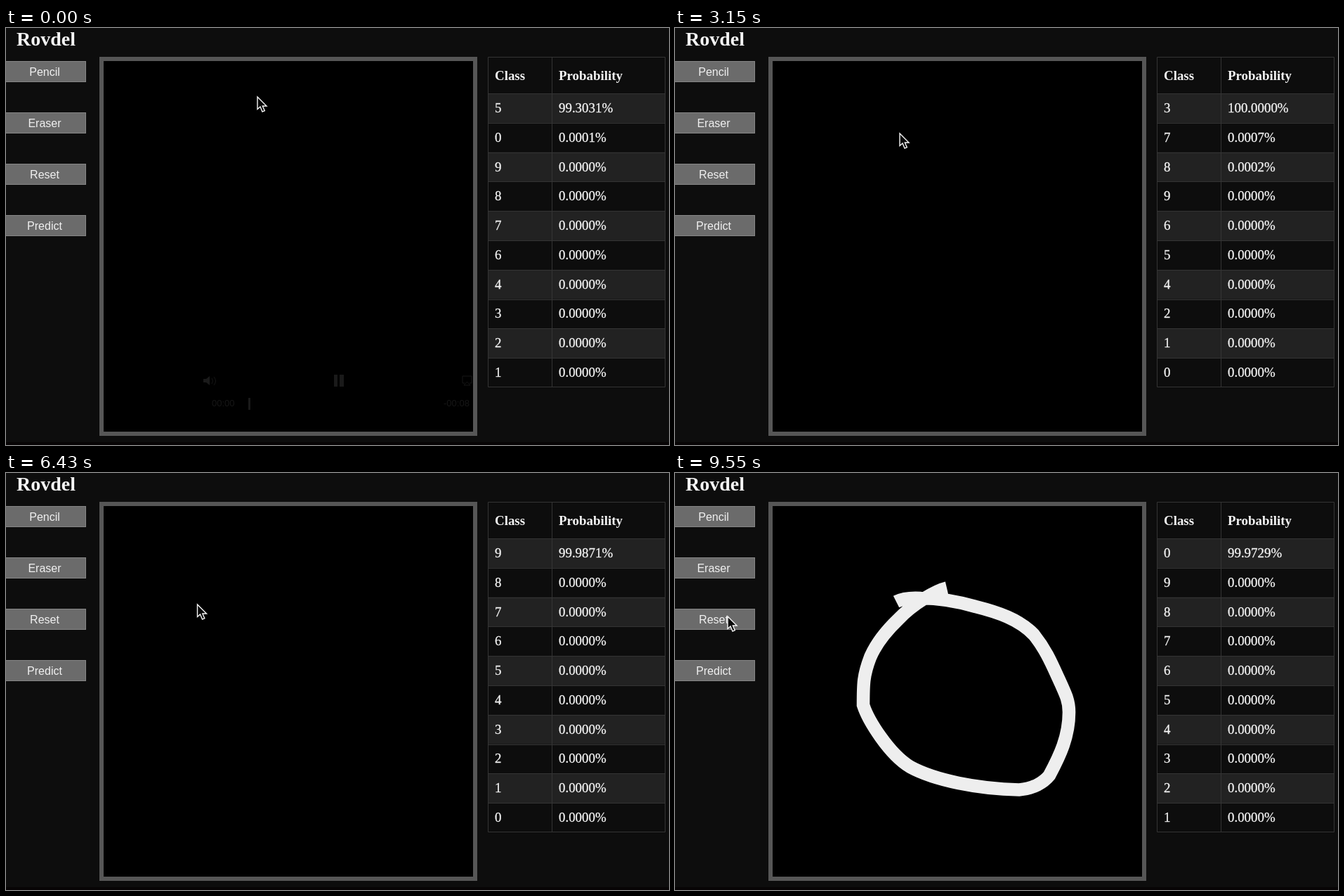
Animation of 944 by 593 pixels, one loop 9700 ms. Source, as an HTML page:

```html
<!DOCTYPE html>
<html lang="en">
<head>
<meta charset="utf-8">
<title>Rovdel</title>
<style>
  html, body { margin: 0; width: 100%; height: 100%; overflow: hidden; background: #0d0d0d; }
  svg { display: block; }
  text { fill: #f4f4f4; font-family: "Liberation Serif", "Times New Roman", serif; }
  .title { font-size: 28px; font-weight: bold; }
  .cell { font-size: 18.9px; stroke: #f4f4f4; stroke-width: .3; }
  .head { font-size: 18.9px; font-weight: bold; }
  .button { font: 16px "Liberation Sans", Arial, sans-serif; text-anchor: middle; fill: #f0f0f0; }
  #player { fill: #1a1a1a; }
  #player text { font: 13px "Liberation Sans", Arial, sans-serif; fill: #161616; }
</style>
</head>
<body>
<svg id="stage" width="944" height="593" viewBox="0 0 944 593">
  <rect y="589" width="944" height="4" fill="#070405"/>
  <text class="title" x="15" y="25">Rovdel</text>
  <g id="ui"></g>
  <rect x="136" y="44" width="532" height="533" fill="#000" stroke="#565656" stroke-width="6"/>
  <g id="player">
    <path d="M281 499h4l5-4v13l-5-4h-4zM467 493h5v17h-5zM475 493h6v17h-6zM345 526h3v17h-3z"/>
    <path d="M293 498q3 4 0 8M296 496q5 6 0 12M653 505h-3v-10h13v10h-3M652 508l4.500-5l4.500 5z" fill="none" stroke="#161616"/>
    <text x="293" y="538">00:00</text>
    <text x="623" y="538">-00:08</text>
  </g>
  <path id="ink" fill="none" stroke="#eee" stroke-width="18.600"/>
  <path id="cursor" d="M0 0V17.500L4 14L7 21L10.300 19.600L7.300 13H13Z" fill="#080808" stroke="#f4f4f4" stroke-width="1.400"/>
</svg>
<script>
const LOOP = 9700;
const ROW = 41.8;
const PREDICT = [75, 285], RESET = [75, 204];
const $ = id => document.getElementById(id);
const ui = $("ui"), ink = $("ink"), cursor = $("cursor"), player = $("player");

function add(tag, attrs, text = "") {
  const el = document.createElementNS("http://www.w3.org/2000/svg", tag);
  for (const key in attrs) el.setAttribute(key, attrs[key]);
  el.textContent = text;
  return ui.appendChild(el);
}

const cadence = [[0, 300], [300, 150], [750, 450], [1200, 150], [2250, 600], [2850, 150],
  [3890, 150], [5080, 150], [7470, 150], [8350, 150]];

// Each round: draw from start to end, press Predict, then Reset
const rounds = [
  { start: 300, end: 600, predict: 750, reset: 1200, top: ["3 100.0000", "7 0.0007", "8 0.0002"],
    d: "M320 125C400 105 490 130 490 190C490 250 420 265 370 270C440 270 510 300 500 370C490 430 400 450 330 430" },
  { start: 1500, end: 2100, predict: 2250, reset: 2850, top: ["3 100.0000", "7 0.0007", "8 0.0002"],
    d: "M312 137.500H424C465 137.500 512 190 512 222C512 262 485 290 470 300C445 312 410 312 353 319.500C430 318 470 330 513 358" },
  { start: 3150, end: 3450, predict: 3600, reset: 3750, top: ["7 100.0000", "5 77.0085", "8 0.0996"],
    d: "M320 150H500C470 250 430 350 400 440" },
  { start: 4190, end: 4940, predict: 5080, reset: 5530, top: ["6 99.9523"],
    d: "M440 159C388 157 354 206 343 236C331 268 329 294 322 318V385C322 405 336 415 357 420C400 430 450 437 490 437C530 438 550 430 568 420C584 405 594 385 594 380V362C588 345 572 310 510 310C450 307 400 304 345 302C320 301 312 306 299 318" },
  { start: 5680, end: 5980, predict: 6130, reset: 6280, top: ["9 99.9871"],
    d: "M490 190C460 150 350 150 340 220C335 290 470 300 490 200V440" },
  { start: 6580, end: 7030, predict: 7180, reset: 7330, top: ["8 77.4686", "5 0.0006"],
    d: "M470 170C420 120 320 170 350 230C380 290 490 300 490 380C480 450 340 450 340 380C340 300 480 270 470 170" },
  { start: 7620, end: 8070, predict: 8220, reset: 8350, top: ["5 99.9999", "7 0.0163"],
    d: "M480 155H350V270C430 240 510 290 490 370C470 440 390 445 330 420" },
  { start: 8650, end: 9100, predict: 9250, reset: 9400, keep: true, top: ["0 99.9729"],
    d: "M387 163.500C372 167 340 185 318 208C295 230 284 248 278 262C268 288 268 300 268 330C275 352 305 400 335 418C370 437 430 449 490 450.500C510 449 525 440 533 430C548 402 561 375 561 340C561 325 558 318 545 290C535 268 527 250 511 230C490 208 460 198 428 190C400 182 375 178 350 178C335 177 325 178 315 183" }
];

// Cursor stops between strokes: [time, point]
const stops = [[0, [358, 98]], [3890, [379, 153]], [5380, [165, 239]], [7470, [472, 155]], [8500, [161, 182]]];
for (const r of rounds) {
  ink.setAttribute("d", r.d);
  r.length = ink.getTotalLength();
  const at = s => { const p = ink.getPointAtLength(s); return [p.x, p.y]; };
  stops.push([r.start, at(0)], [r.end, at(r.length)], [r.predict, PREDICT], [r.reset, RESET]);
}
stops.push([LOOP, RESET]);
stops.sort((a, b) => a[0] - b[0]);

["Pencil", "Eraser", "Reset", "Predict"].forEach((label, i) => {
  const y = 48 + 73 * i;
  add("rect", { x: -4.5, y: y - .5, width: 118, height: 29, fill: "#6b6b6b", stroke: "#868686" });
  add("text", { class: "button", x: 55, y: y + 20 }, label);
});

const line = { fill: "none", stroke: "#343434" };
const rows = [];
for (let i = 0; i < 10; i++) {
  const y = 93 + ROW * i;
  if (i % 2 === 0) add("rect", { x: 686, y, width: 253, height: ROW, fill: "#222" });
  add("path", { ...line, d: `M686 ${Math.round(y) + .5}H939` });
  rows.push([696, 787].map(x => add("text", { class: "cell", x, y: 120 + 41.75 * i })));
}
add("path", { ...line, d: "M686.500 41.500H938.500V510.500H686.500ZM777.500 42V510" });
add("text", { class: "head", x: 696, y: 74 }, "Class");
add("text", { class: "head", x: 787, y: 74 }, "Probability");

function showTable(top) {
  const found = top.map(s => s.split(" "));
  for (let n = 9; n >= 0; n--)
    if (!found.some(f => f[0] === String(n))) found.push([String(n), "0.0000"]);
  found.forEach(([digit, share], i) => {
    rows[i][0].textContent = digit;
    rows[i][1].textContent = share + "%";
  });
}

function cursorAt(t, round, drawn) {
  if (round && t >= round.start && t <= round.end) {
    const p = ink.getPointAtLength(drawn);
    return [p.x, p.y];
  }
  const i = Math.max(1, stops.findIndex(s => s[0] > t));
  const [t0, a] = stops[i - 1], [t1, b] = stops[i];
  const k = (t - t0) / (t1 - t0);
  return a.map((v, j) => v + (b[j] - v) * k);
}

let shown;
function render(now) {
  const time = now % LOOP;
  const [from, step] = cadence.filter(c => c[0] <= time).pop();
  const t = from + Math.floor((time - from) / step) * step;

  const round = rounds.find(r => t >= r.start && (t < r.reset || r.keep));
  let drawn = 0;
  if (round) {
    drawn = round.length * Math.min(1, (t - round.start) / (round.end - round.start));
    ink.setAttribute("d", round.d);
    ink.setAttribute("stroke-dasharray", `${drawn} 9999`);
  }
  ink.setAttribute("visibility", drawn > 0 ? "visible" : "hidden");

  const [x, y] = cursorAt(t, round, drawn);
  cursor.setAttribute("transform", `translate(${x} ${y})`);
  player.setAttribute("visibility", t < 300 ? "visible" : "hidden");

  const last = rounds.filter(r => r.predict <= t).pop();
  const top = last ? last.top : ["5 99.3031", "0 0.0001"];
  if (top[0] !== shown) showTable(top);
  shown = top[0];
}

const begin = performance.now();
function tick() {
  render(performance.now() - begin);
  requestAnimationFrame(tick);
}
tick();
</script>
</body>
</html>
```
